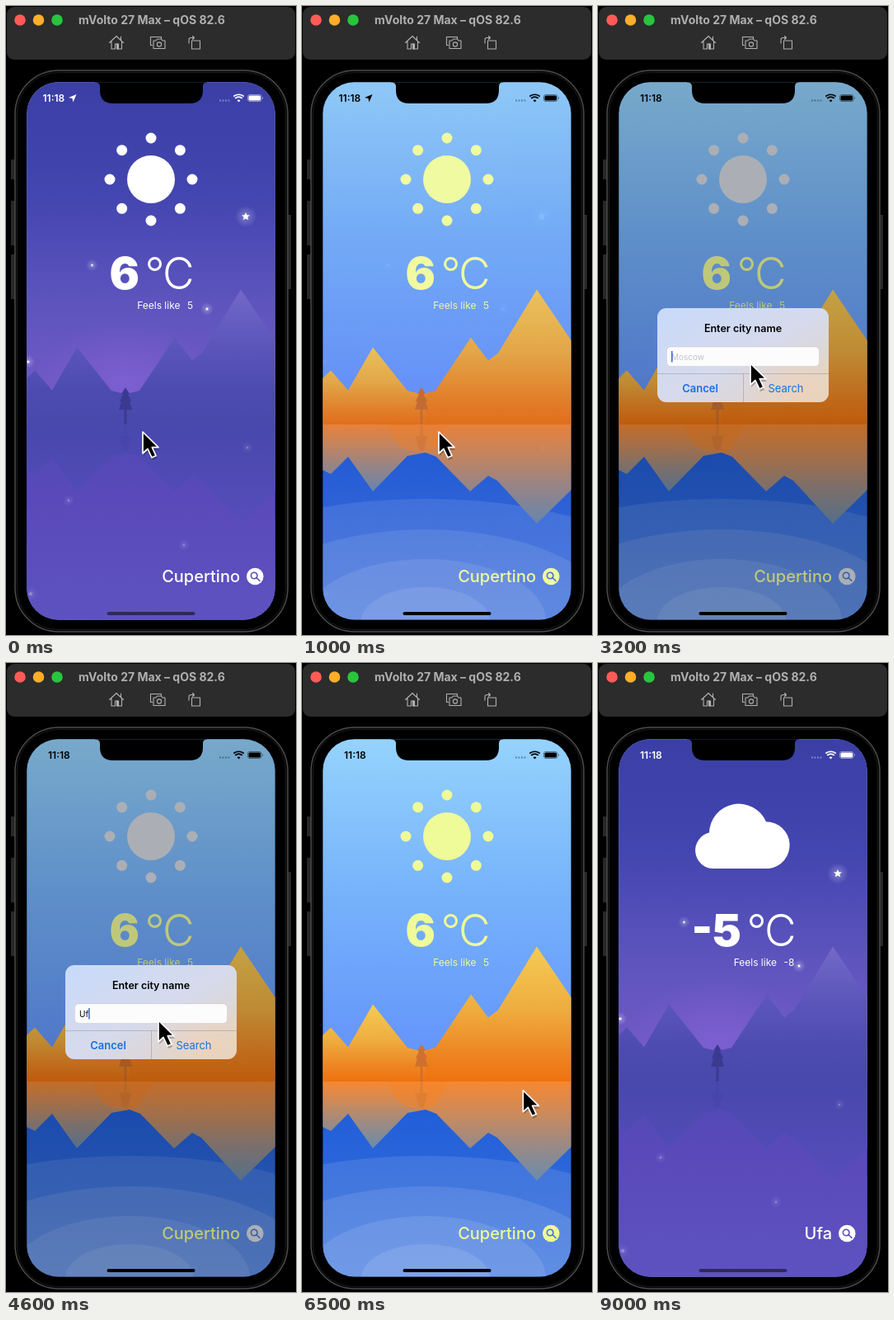
These frames come from a looping animation (352 by 762 pixels, 9.1 s). An HTML page:

```html
<!DOCTYPE html>
<html lang="en">
<head>
<meta charset="utf-8">
<title>Weather app</title>
<style>
  html, body { margin: 0; height: 100%; overflow: hidden; background: #000; }
  svg { display: block; width: 100%; height: 100%; font-family: Inter, Roboto, "Liberation Sans", sans-serif; }
  .mid { text-anchor: middle; }
  .end { text-anchor: end; }
  .line { fill: none; stroke: #b0b1b2; stroke-width: 1.1; stroke-linecap: round; stroke-linejoin: round; }
</style>
</head>
<body>
<svg viewBox="0 0 352 762">
  <defs>
    <g id="gradients"></g>
    <clipPath id="screen"><rect x="25.300" y="92.300" width="301.300" height="651.200" rx="38"/></clipPath>
    <clipPath id="card"><rect x="72" y="366" width="208" height="114" rx="11"/></clipPath>
    <radialGradient id="glow"><stop stop-color="#fff" stop-opacity=".3"/><stop offset="1" stop-color="#fff" stop-opacity="0"/></radialGradient>
    <radialGradient id="haze"><stop stop-color="#8663d8" stop-opacity=".6"/><stop offset="1" stop-color="#8663d8" stop-opacity="0"/></radialGradient>
    <radialGradient id="warm"><stop stop-color="#ffcf9c" stop-opacity=".75"/><stop offset="1" stop-color="#ffcf9c" stop-opacity="0"/></radialGradient>
    <linearGradient id="glass" x2="1" y2="1"><stop stop-color="#c8dafa"/><stop offset=".5" stop-color="#d6daec"/><stop offset="1" stop-color="#e4d3c2"/></linearGradient>
    <path id="leftHills" d="M25 507V451L35 441.500 56 465.500 86 413.500 128 466 140 469 150 469V507Z"/>
    <path id="rightHills" d="M150 507V469L162 466 205 401.500 226 429.500 238 420.500 285 343.500 327 405.500V507Z"/>
    <path id="leftMirror" d="M25 507V562L35 567 56 546 86 588 128 545 150 541V507Z"/>
    <path id="rightMirror" d="M150 507V541L163 546 204 588 226 569 237 575 285 627 327 586V507Z"/>
    <path id="tree" d="M145 462l5 8h-2l4 9h-2l3 10h-6.500v18h-3v-18h-6.500l3-10h-2l4-9h-2z"/>
    <path id="star" d="M0-5L1.500-1.700 5-1.500 2.300.8 3.200 4.300 0 2.400-3.200 4.300-2.300.8-5-1.500-1.500-1.700Z"/>
  </defs>

  <!-- simulator window -->
  <rect x="1" y="1" width="350" height="64" rx="9" fill="#2c2c2d"/>
  <circle cx="17" cy="17" r="6.800" fill="#ff5b56"/>
  <circle cx="39.500" cy="17" r="6.800" fill="#fdae2a"/>
  <circle cx="62" cy="17" r="6.800" fill="#29c53f"/>
  <text x="88" y="21.500" font-size="14" font-weight="700" fill="#afafaf">mVolto 27 Max – qOS 82.6</text>
  <g class="line">
    <path d="M125.500 44.500l8.500-8 8.500 8M128 43v9h4.500v-6h3.500v6h4.500v-9M139.500 41v-4"/>
    <path d="M134.500 46h2v6h-2z" fill="#b0b1b2"/>
    <path d="M177.500 47.500h-2v-10h13v2.500M179 42h3l1.500-2h5l1.500 2h3v9.500h-14z"/>
    <circle cx="186" cy="46.500" r="2.600"/>
    <path d="M225.500 42h10v10h-10zM222 45v-4q0-2.500 2.500-2.500h3.500M226.500 36.500l2 2-2 2"/>
  </g>

  <!-- phone body -->
  <path fill="#282828" d="M6 186h5v24H6zM6 236h5v54H6zM6 301h5v54H6zM341 253h5v90h-5z"/>
  <rect x="11" y="78" width="331" height="680" rx="53" fill="#050505" stroke="#4b4b4b" stroke-width="1.500"/>
  <rect x="13.500" y="80.500" width="326" height="675" rx="50" fill="#000" stroke="#1b1b1b"/>

  <g clip-path="url(#screen)">
    <g id="day">
      <rect x="25" y="92" width="302" height="416" fill="url(#daySky)"/>
      <use href="#leftHills" fill="url(#dayLeft)"/>
      <use href="#rightHills" fill="url(#dayRight)"/>
      <rect x="25" y="507" width="302" height="237" fill="url(#dayWater)"/>
      <g fill="#fff" fill-opacity=".1">
        <ellipse cx="150" cy="745" rx="340" ry="148"/>
        <ellipse cx="150" cy="745" rx="230" ry="111"/>
        <ellipse cx="150" cy="745" rx="146" ry="75"/>
        <ellipse cx="150" cy="745" rx="78" ry="41"/>
      </g>
      <use href="#leftMirror" fill="url(#dayLeftMirror)"/>
      <use href="#rightMirror" fill="url(#dayRightMirror)"/>
      <path d="M104 507q6 23 24 31l22 3 13-6 14-28z" fill="#f88324" opacity=".5"/>
      <use href="#tree" fill="#d0702c"/>
      <use href="#tree" fill="#d0702c" opacity=".4" transform="translate(0 863) scale(1 -.7)"/>
    </g>
    <g id="night">
      <rect x="25" y="92" width="302" height="416" fill="url(#nightSky)"/>
      <ellipse cx="145" cy="455" rx="110" ry="75" fill="url(#haze)"/>
      <g fill="url(#nightHills)"><use href="#leftHills"/><use href="#rightHills"/></g>
      <rect x="25" y="507" width="302" height="237" fill="url(#nightWater)"/>
      <g fill="url(#nightMirror)"><use href="#leftMirror"/><use href="#rightMirror"/></g>
      <use href="#tree" fill="#3a3a91"/>
      <use href="#tree" fill="#3a3a91" opacity=".15" transform="translate(0 863) scale(1 -.7)"/>
      <g id="stars"></g>
    </g>

    <g id="tinted">
      <g id="sun">
        <circle cx="176" cy="210" r="29"/>
        <circle id="rays" cx="176" cy="210" r="50" fill="none" stroke-width="13" stroke-linecap="round" pathLength="8" stroke-dasharray="0 1"/>
      </g>
      <path id="cloud" d="M140 249a22 22 0 0 1-5-43.400A36 36 0 0 1 204 192.200 28.500 28.500 0 0 1 207.500 249Z"/>
      <g id="reading" font-size="54">
        <text id="temp" class="end" x="162" y="343" font-weight="900"></text>
        <text x="168.500" y="343" font-size="53" font-weight="350" letter-spacing="-2">°C</text>
      </g>
      <g font-size="12">
        <text id="feels" class="end" y="367">Feels like</text>
        <text id="feelsValue" class="end" y="367"></text>
      </g>
      <text id="city" class="end" x="284" y="698" font-size="20" font-weight="500"></text>
    </g>
    <g id="button">
      <circle id="disc" cx="302.300" cy="691" r="10.300"/>
      <path id="lens" d="M304 692.500l4 4M305 690a3.800 3.800 0 1 1-7.600 0a3.800 3.800 0 1 1 7.600 0" fill="none" stroke-width="1.600" stroke-linecap="round"/>
    </g>

    <rect id="dim" x="25" y="92" width="302" height="652"/>

    <g id="status">
      <text id="clock" y="116" font-size="12" font-weight="600">11:18</text>
      <path id="locator" d="M85.500 107l-4 9.500-1-4.500-4.500-1z"/>
      <path d="M259 113.500h2v2h-2zM262.500 113.500h2v2h-2zM266 113.500h2v2h-2zM269.500 113.500h2v2h-2z" opacity=".35"/>
      <path d="M282.500 116.500l-2-2.300q2-1.500 4 0zM278.800 112.600q3.700-3 7.400 0l1.300-1.400q-5-4-10 0zM276.600 110.300q5.900-4.800 11.800 0l.8-1.500q-6.700-4.700-13.400 0z"/>
      <rect x="293.500" y="107.500" width="16.500" height="8" rx="2.300" fill="none" stroke="currentColor" opacity=".45"/>
      <rect x="294.500" y="108.500" width="14.500" height="6" rx="1.500"/>
      <path d="M311 110q2 1.500 0 3z" opacity=".5"/>
    </g>
    <rect id="home" x="122.500" y="734" width="107" height="4" rx="2"/>
    <path d="M108 91.500h136v1q-5 0-5 5v4.500q0 16-16 16h-93q-16 0-16-16v-4.500q0-5-6-5z"/>

    <g id="alert">
      <g clip-path="url(#card)">
        <rect x="72" y="366" width="208" height="114" fill="url(#glass)"/>
        <ellipse cx="245" cy="460" rx="80" ry="55" fill="url(#warm)" opacity=".5"/>
        <rect id="pressed" x="176.500" y="445.500" width="104" height="35" opacity=".13"/>
        <path d="M72 445.500h208M176.500 445.500v35" stroke="#000" stroke-opacity=".16"/>
      </g>
      <rect x="83.500" y="413" width="185" height="23.500" rx="5" fill="#fcfcfd" stroke="#000" stroke-opacity=".12" stroke-width=".6"/>
      <text class="mid" x="176" y="394.500" font-size="12.500" font-weight="600">Enter city name</text>
      <text id="hint" x="89" y="429" font-size="10" fill="#c3c3c7">Moscow</text>
      <text id="typed" x="89" y="429" font-size="10"></text>
      <rect id="caret" y="418" width="1.500" height="13.500" fill="#3b62e0"/>
      <g class="mid" font-size="13" fill="#1670e4">
        <text x="124" y="468" font-weight="600">Cancel</text>
        <text x="228" y="468">Search</text>
      </g>
    </g>
  </g>

  <g id="cursor">
    <path d="M2 3V30L8 24.500 13 35 18 33 13 23H21Z" opacity=".25"/>
    <path d="M1 1V27L7 21.500 12 32 17 29.800 12.300 19.600H20Z" stroke="#fff" stroke-width="1.700" stroke-linejoin="round"/>
  </g>
</svg>

<script>
const LOOP = 9100;
const $ = id => document.getElementById(id);
const set = (id, attrs) => { for (const k in attrs) $(id).setAttribute(k, attrs[k]); };
const show = (id, on) => set(id, { visibility: on ? 'visible' : 'hidden' });
const ease = (t, from, to) => {
  const p = Math.min(1, Math.max(0, (t - from) / (to - from)));
  return p * p * (3 - 2 * p);
};
const mix = (a, b, p) => `rgb(${a.map((v, i) => v + (b[i] - v) * p)})`;

// name, top, bottom, then pairs of offset and colour
function gradient(name, y1, y2, ...stops) {
  let inner = '';
  for (let i = 0; i < stops.length; i += 2)
    inner += `<stop offset="${stops[i]}" stop-color="${stops[i + 1]}"/>`;
  $('gradients').innerHTML += `<linearGradient id="${name}" gradientUnits="userSpaceOnUse" x1="0" x2="0" y1="${y1}" y2="${y2}">${inner}</linearGradient>`;
}
const sunlit = [0, '#f5ca55', .45, '#eeae40', .8, '#ee8522', 1, '#ee720f'];
const reflected = [0, '#f58832', .3, '#cf8a58', .6, '#a08a80', 1, '#6a8bac'];
gradient('daySky', 93, 470, 0, '#95d3fd', .5, '#76b2fb', 1, '#6495fb');
gradient('dayLeft', 414, 507, ...sunlit);
gradient('dayRight', 344, 507, ...sunlit);
gradient('dayWater', 507, 744, 0, '#1b5bd8', .3, '#2662d9', 1, '#3a72dc');
gradient('dayLeftMirror', 507, 588, ...reflected);
gradient('dayRightMirror', 507, 627, ...reflected);
gradient('nightSky', 93, 470, 0, '#3b3fa5', .35, '#4345b0', .7, '#5d54bd', 1, '#7159c5');
gradient('nightHills', 344, 507, 0, '#7269c8', .4, '#5c56bb', .75, '#4d4bb0', 1, '#4848ad');
gradient('nightWater', 507, 744, 0, '#4f49b5', .35, '#5a49ba', 1, '#5e52c0');
gradient('nightMirror', 507, 627, 0, '#4848ad', 1, '#564db9');

// x, y, size, brightness
const stars = [[291, 255, 1, 1], [104.5, 314, .4, .9], [244, 367, .45, 1], [27, 431, .45, 1],
  [293, 535, .35, .35], [76, 599, .35, .4], [216, 653, .35, .4], [30, 712, .6, .35]];
$('stars').innerHTML = stars.map(([x, y, s, o]) =>
  `<g transform="translate(${x} ${y})" opacity="${o}"><circle r="${4 + 9 * s}" fill="url(#glow)"/>` +
  `<use href="#star" transform="scale(${s})" fill="#fff"/></g>`).join('');

// time, x, y of the pointer tip
const path = [[0, 165, 515], [1300, 165, 515], [2100, 299, 688], [2550, 299, 688], [3150, 184, 432],
  [4900, 184, 432], [5500, 232, 458], [6050, 232, 458], [6900, 297, 566], [7900, 297, 566], [8450, 318, 766]];
function pointer(t) {
  const i = path.findIndex(k => k[0] > t);
  if (i < 0) return path[path.length - 1].slice(1);
  const a = path[i - 1], b = path[i], p = ease(t, a[0], b[0]);
  return [a[1] + (b[1] - a[1]) * p, a[2] + (b[2] - a[2]) * p];
}

const keys = [4200, 4450, 4700];
const YELLOW = [239, 250, 152], WHITE = [255, 255, 255], GREY = [214, 218, 226];

function draw(t) {
  const night = 1 - ease(t, 500, 1100) + ease(t, 7500, 8400);
  const alert = ease(t, 2600, 2900) - ease(t, 5950, 6200);
  const found = t >= 6700;
  const tint = mix(YELLOW, WHITE, night);
  const icon = alert > 0 ? mix(YELLOW, GREY, alert) : tint;

  set('night', { opacity: night });
  set('tinted', { fill: tint });
  set('sun', { fill: icon });
  set('rays', { stroke: icon });
  show('sun', !found);
  show('cloud', found);
  $('temp').textContent = found ? '-5' : '6';
  $('feelsValue').textContent = found ? '-8' : '5';
  $('city').textContent = found ? 'Ufa' : 'Cupertino';
  set('reading', { transform: `translate(${found ? 12 : 0} 0)` });
  set('feels', { x: found ? 217 : 211.5 });
  set('feelsValue', { x: found ? 238.5 : 227 });
  set('disc', { fill: icon });
  set('lens', { stroke: mix([66, 116, 216], [90, 79, 190], night) });
  set('button', { opacity: t >= 2300 && t < 2550 ? .2 : 1 });

  const ink = night > .2 ? '#fff' : '#000', located = t < 1500;
  set('status', { fill: ink, color: ink });
  set('clock', { x: located ? 44.5 : 51 });
  show('locator', located);
  set('home', { opacity: 1 - .5 * night });

  set('dim', { opacity: .2 * alert });
  const grow = t < 4000 ? 1.15 - .15 * alert : 1;
  set('alert', { opacity: alert, transform: `translate(176 423) scale(${grow}) translate(-176 -423)` });
  show('alert', alert > 0);
  if (alert > 0) {
    const count = keys.filter(k => t >= k).length;
    $('typed').textContent = 'Ufa'.slice(0, count);
    set('hint', { opacity: count ? 0 : 1 });
    set('caret', {
      x: 89 + (count ? $('typed').getComputedTextLength() : 0),
      opacity: (t - (count ? keys[count - 1] : 2900) + 1000) % 1000 < 500 ? 1 : 0
    });
    set('pressed', { opacity: t >= 5650 ? .13 : 0 });
  }
  set('cursor', { transform: `translate(${pointer(t)})` });
}

let start;
function tick(now) {
  start ??= now;
  draw((now - start) % LOOP);
  requestAnimationFrame(tick);
}
draw(0);
requestAnimationFrame(tick);
</script>
</body>
</html>
```
